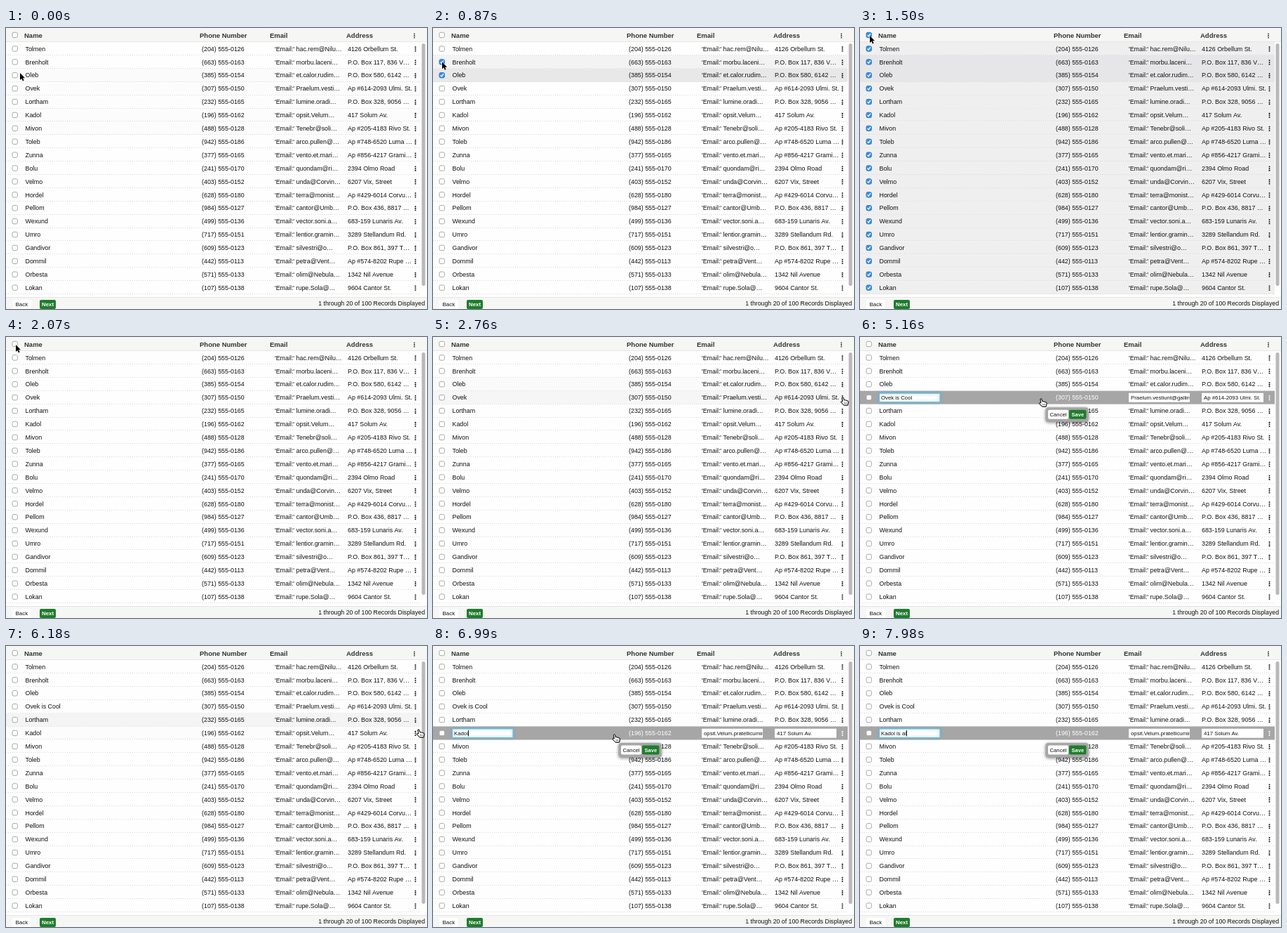
An HTML page with a canvas for the animation above (8 s loop, 600 px wide and 400 px high).

```html
<!DOCTYPE html>
<html lang="en">
<head>
<meta charset="utf-8">
<title>Editable records table</title>
<style>
html, body { margin: 0; width: 100%; height: 100%; overflow: hidden; background: #fefefe; }
canvas { display: block; }
</style>
</head>
<body>
<canvas id="stage" width="600" height="400"></canvas>
<script>
const ctx = document.getElementById('stage').getContext('2d');
const LOOP = 8000, ROW_H = 18.9, TOP = 20;
const FONT = '"Liberation Sans", Arial, sans-serif';
const INK = '#101010', GREEN = '#1f7d2c', PAPER = '#fefefe', BAR = '#f6f6f5', GRAY = '#a6a6a6';

// name | phone | e-mail | address
const records = `Tolmen|(204) 555-0126|hac.rem@Nilu…|4126 Orbellum St.
Brenholt|(663) 555-0163|morbu.laceni…|P.O. Box 117, 836 V…
Oleb|(385) 555-0154|et.calor.rudim…|P.O. Box 580, 6142 …
Ovek|(307) 555-0150|Praelum.vesti…|Ap #614-2093 Ulmi. St.
Lortham|(232) 555-0165|lumine.oradi…|P.O. Box 328, 9056 …
Kadol|(196) 555-0162|opsit.Velum…|417 Solum Av.
Mivon|(488) 555-0128|Tenebr@soli…|Ap #205-4183 Rivo St.
Toleb|(942) 555-0186|arco.pullen@…|Ap #748-6520 Luma …
Zunna|(377) 555-0165|vento.et.mari…|Ap #856-4217 Grami…
Bolu|(241) 555-0170|quondam@ri…|2394 Olmo Road
Velmo|(403) 555-0152|unda@Corvin…|6207 Vix, Street
Hordel|(628) 555-0180|terra@monist…|Ap #429-6014 Corvu…
Pellom|(984) 555-0127|cantor@Umb…|P.O. Box 436, 8817 …
Wexund|(499) 555-0136|vector.soni.a…|683-159 Lunaris Av.
Umro|(717) 555-0151|lentior.gramin…|3289 Stellandum Rd.
Gandivor|(609) 555-0123|silvestri@o…|P.O. Box 861, 397 T…
Dommil|(442) 555-0113|petra@Vent…|Ap #574-8202 Rupe …
Orbesta|(571) 555-0133|olim@Nebula…|1342 Nil Avenue
Lokan|(107) 555-0138|rupe.Sola@…|9604 Cantor St.`.split('\n').map(line => line.split('|'));

const edits = [
  { row: 3, open: 3050, type: 3800, step: 100, close: 5600, suffix: ' is Cool', email: 'Praelum.vestiunt@gallim' },
  { row: 5, open: 6500, type: 7250, step: 130, close: 9000, suffix: ' is al', email: 'opsit.Velum.pratellicumin' }
];
const ALL_ON = 1350, ALL_OFF = 1800;
const checkedAt = { 1: 850, 2: 350 };

// Pointer stops: time, x, y
const path = [
  [-300, 60, 150], [0, 20, 64], [200, 13, 67], [500, 13, 66], [750, 13, 49], [950, 13, 48],
  [1250, 14, 11], [2100, 14, 11], [2750, 583, 86], [3050, 583, 86], [3510, 311, 93],
  [3700, 257, 88], [5160, 257, 88], [5450, 310, 110], [5650, 310, 110], [6100, 570, 112],
  [6180, 587, 119], [6350, 583, 124], [6550, 583, 124], [7000, 257, 126], [8000, 257, 126]
];

const clamp = v => Math.max(0, Math.min(1, v));
const center = row => TOP + ROW_H * (row + 0.5);

function pointer(t) {
  const i = Math.max(1, path.findIndex(p => p[0] > t));
  const [a, b] = [path[i - 1], path[i]];
  const u = clamp((t - a[0]) / (b[0] - a[0])), k = u * u * (3 - 2 * u);
  return [a[1] + (b[1] - a[1]) * k, a[2] + (b[2] - a[2]) * k];
}

// Share of the last 300 ms that the pointer spent on each row
function hoverLevels(t) {
  const levels = Array(20).fill(0);
  for (let lag = 0; lag < 300; lag += 30) {
    const row = Math.floor((pointer(t - lag)[1] - TOP) / ROW_H);
    if (row >= 0) levels[row] += 0.1;
  }
  return levels;
}

function text(str, x, y, size = 8.9, color = INK, bold = false, align = 'left') {
  ctx.font = `${bold ? 'bold ' : ''}${size}px ${FONT}`;
  ctx.textAlign = align;
  ctx.fillStyle = color;
  ctx.fillText(str, x, y + size * 0.36);
}

function box(x, y, w, h, fill, radius = 0, stroke) {
  ctx.beginPath();
  ctx.roundRect(x, y, w, h, radius);
  ctx.fillStyle = fill;
  ctx.fill();
  if (stroke) {
    ctx.strokeStyle = stroke;
    ctx.lineWidth = 1;
    ctx.stroke();
  }
}

function glow(color, blur, dy, draw) {
  ctx.save();
  ctx.shadowColor = color;
  ctx.shadowBlur = blur;
  ctx.shadowOffsetY = dy;
  draw();
  ctx.restore();
}

function lines(points, color, width) {
  ctx.beginPath();
  points.forEach(([x, y]) => ctx.lineTo(x, y));
  ctx.strokeStyle = color;
  ctx.lineWidth = width;
  ctx.stroke();
}

function checkbox(y, on) {
  box(9, y - 3.7, 7.4, 7.4, on ? '#3b8ee0' : '#fff', 2, on ? '#2f7fce' : '#a9a9a9');
  if (on) lines([[10.6, y], [12.2, y + 1.8], [15, y - 2]], '#fff', 1.3);
}

function dots(x, y, color) {
  for (let i = -1; i <= 1; i++) box(x - 0.9, y + i * 2.7 - 0.9, 1.8, 1.8, color, 0.5);
}

function drawRow(row, t, hover) {
  const [name, phone, email, address] = records[row];
  const y = center(row), top = y - ROW_H / 2;
  const start = checkedAt[row] ?? ALL_ON;
  const level = clamp((t - start) / 250) * (1 - clamp((t - ALL_OFF) / 250));
  const tint = (color, alpha) => {
    ctx.globalAlpha = alpha;
    box(0, top, 591, ROW_H, color);
    ctx.globalAlpha = 1;
  };
  if (level) tint('#e6e6e8', level);
  if (hover) tint('#f2f2f2', clamp(hover));

  ctx.setLineDash([1, 2]);
  lines([[0, Math.round(top + ROW_H) - 0.5], [591, Math.round(top + ROW_H) - 0.5]], '#d6d6da', 1);
  ctx.setLineDash([]);

  const saved = edits.find(e => e.row === row && t >= e.close);
  checkbox(y, t >= start && t < ALL_OFF);
  text(name + (saved ? saved.suffix : ''), 27.5, y);
  text(phone, 279, y);
  text(`'Email:' ${email}`, 383, y);
  text(address, 487, y);
  dots(583.5, y + 0.5, INK);
}

function drawEditor(e, t) {
  const [name, phone, , address] = records[e.row];
  const y = center(e.row);
  const count = Math.max(0, Math.min(e.suffix.length, Math.floor((t - e.type) / e.step) + 1));
  const value = name + e.suffix.slice(0, count);
  box(0, y - ROW_H / 2, 591, ROW_H, GRAY);
  checkbox(y, false);
  text(phone, 279, y, 8.9, '#fff');
  dots(583.5, y + 0.5, '#fff');

  glow('#58b4dc', 4, 0, () => box(27.5, y - 6, 86.5, 12.5, '#fff', 0, '#74b9d6'));
  box(383, y - 6.3, 87, 13, '#fff');
  box(487, y - 6.3, 88, 13, '#fff');
  text(value, 30, y + 0.4, 7.8);
  const caretX = 30.5 + ctx.measureText(value).width;
  ctx.save();
  ctx.beginPath();
  ctx.rect(383, y - 7, 86.5, 14);
  ctx.clip();
  text(e.email, 386, y + 0.4, 7.8);
  ctx.restore();
  text(address, 490, y + 0.4, 7.8);

  const lastKey = count ? e.type + (count - 1) * e.step : e.open;
  if ((t - lastKey) % 1000 < 500) lines([[caretX, y - 4], [caretX, y + 4.5]], INK, 1);

  glow('rgba(0,0,0,.5)', 4, 1, () => box(264.5, y + 14, 61, 20.5, GRAY, 4));
  box(268, y + 17.5, 29, 13, '#fff', 2);
  box(298, y + 17.5, 24.5, 13, GREEN, 2);
  text('Cancel', 282.5, y + 24, 7.7, INK, false, 'center');
  text('Save', 310.3, y + 24, 7.5, '#fff', true, 'center');
}

function drawPointer(t) {
  if (edits.some(e => t >= e.type && t < Math.min(e.close, e.type + 1250))) return;
  const [x, y] = pointer(t);
  const arrow = x < 24 || y < TOP;
  const shape = new Path2D(arrow
    ? 'M0 0V10L2.3 7.9L3.9 11.4L5.6 10.6L4 7.3H7Z'
    : 'M0 .5Q1-.8 2 .5L3 4Q4.5 3 5.2 4.4Q6.8 3.6 7.2 5Q9 4.6 9 6.5L8.2 11H2.6L-1.6 6.6Q-1.7 5.1 .9 6Z');
  ctx.save();
  ctx.translate(x, y);
  ctx.lineJoin = 'round';
  ctx.lineWidth = 1;
  ctx.fillStyle = arrow ? '#000' : '#fff';
  ctx.strokeStyle = arrow ? '#fff' : '#111';
  ctx.stroke(shape);
  ctx.fill(shape);
  if (!arrow) {
    ctx.stroke(shape);
    for (let i = 0; i < 3; i++) lines([[3.4 + i * 1.5, 7], [3.6 + i * 1.4, 9.2]], '#333', 0.6);
  }
  ctx.restore();
}

function draw(t) {
  box(0, 0, 600, 400, PAPER);
  const hover = hoverLevels(t);
  records.forEach((_, row) => drawRow(row, t, hover[row]));

  box(0, 0, 600, TOP, BAR);
  lines([[0, TOP - 0.5], [600, TOP - 0.5]], '#e6e6e6', 1);
  checkbox(10, t >= ALL_ON && t < ALL_OFF);
  [['Name', 26], ['Phone Number', 276], ['Email', 376], ['Address', 485]]
    .forEach(([label, x]) => text(label, x, 10.2, 9.5, '#333', true));
  dots(582, 11, '#444');

  box(592.5, 22, 5, 345, '#b9b9b9', 2.5);

  const edit = edits.find(e => t >= e.open && t < e.close);
  if (edit) drawEditor(edit, t);

  box(0, 384, 600, 16, BAR);
  lines([[0, 383.5], [600, 383.5]], '#e6e6e6', 1);
  box(9, 387, 27, 13, '#fff', 2);
  box(48, 387, 23, 13, GREEN, 2);
  text('Back', 22.3, 393.6, 8, INK, false, 'center');
  text('Next', 59.5, 393.6, 7.9, '#fff', true, 'center');
  text('1 through 20 of 100 Records Displayed', 597, 392.3, 8.75, INK, false, 'right');
  drawPointer(t);
}

const began = performance.now();
function tick() {
  draw((performance.now() - began) % LOOP);
  requestAnimationFrame(tick);
}
tick();
</script>
</body>
</html>
```
